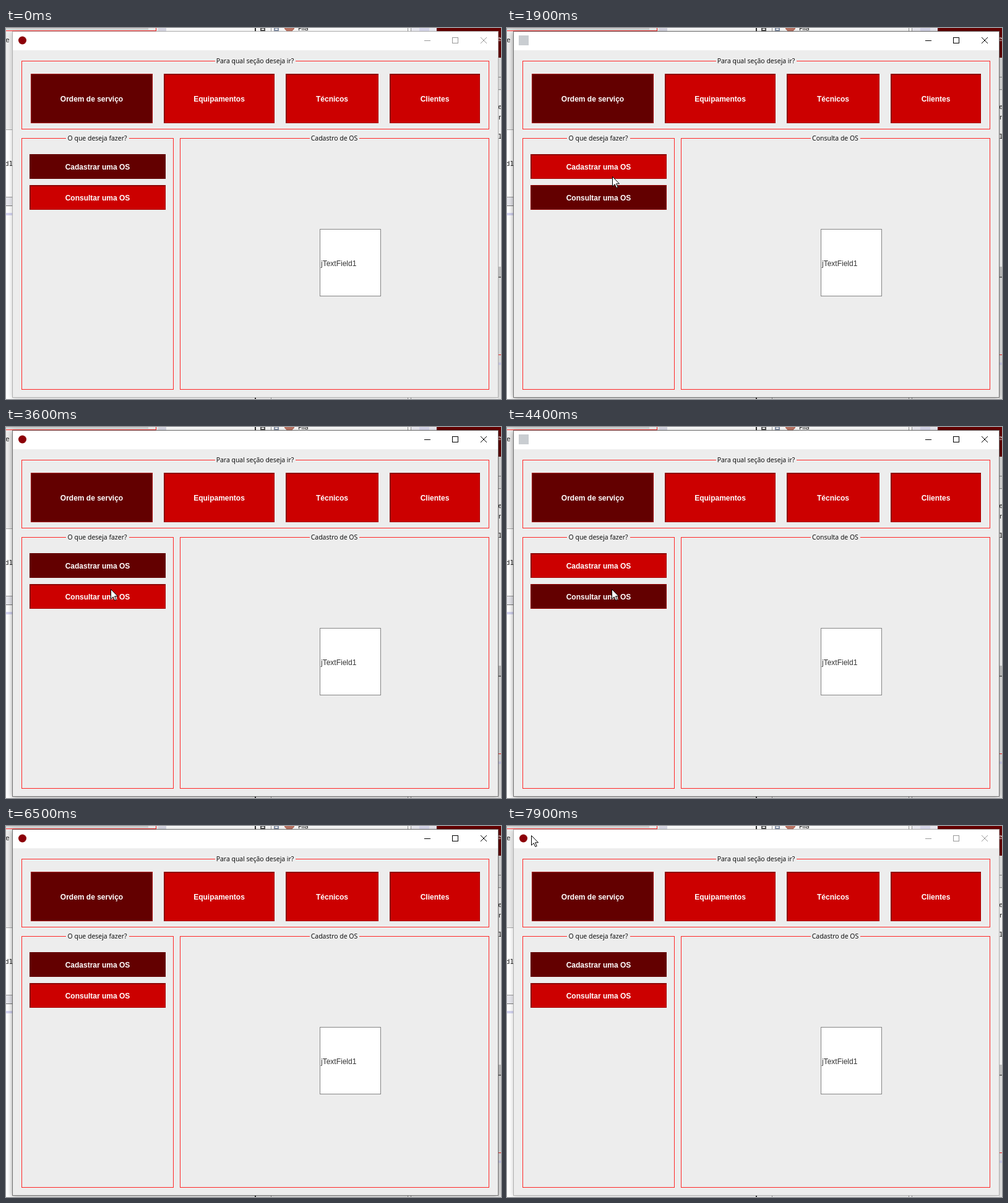
An HTML page for the animation above (8 s loop, 800 by 600 pixels).

```html
<!DOCTYPE html>
<html lang="pt-BR">
<head>
<meta charset="utf-8">
<title>Cadastro de OS</title>
<style>
  html, body { margin: 0; width: 100%; height: 100%; overflow: hidden; background: #fff; }
  svg { display: block; width: 800px; height: 600px; shape-rendering: crispEdges; }
  #cursor, #mark, #close { shape-rendering: auto; }
  text { font: 10.5px "Open Sans", sans-serif; }
  .button { font: bold 12px "Liberation Sans", Arial, sans-serif; fill: #fff; text-anchor: middle; }
  .label { text-anchor: middle; }
  .field { font: 12px "Liberation Sans", Arial, sans-serif; fill: #333; }
  .code { font: 11px "DejaVu Sans Mono", monospace; }
  .frame { fill: none; stroke: #ff2626; }
</style>
</head>
<body>
<svg id="stage" viewBox="0 0 800 600">
  <defs>
    <filter id="blur" x="-5%" y="-5%" width="110%" height="110%"><feGaussianBlur stdDeviation="4"/></filter>
  </defs>
  <g id="desktop"></g>
  <rect id="shadow" x="10" y="7" width="786" height="592" filter="url(#blur)"/>
  <rect x="11" y="6" width="784" height="592" fill="#ededed"/>
  <rect x="11" y="6" width="784" height="30" fill="#fff"/>
  <rect id="edge" x="10.5" y="5.5" width="785" height="592" fill="none"/>
  <g id="controls" fill="none">
    <path d="M676 20.5h10M721.5 15.5h9v9h-9z"/>
    <path id="close" d="M767 15l10 10M777 15l-10 10"/>
  </g>
  <circle id="mark" cx="26.5" cy="20" r="6.5" fill="#8c0008"/>
  <rect id="square" x="19" y="12" width="16" height="16" fill="#c9cdd1"/>
  <g id="panels"></g>
  <rect x="507.5" y="325.5" width="98" height="108" fill="#fff" stroke="#858585"/>
  <text class="field" x="509" y="385">jTextField1</text>
  <path id="cursor" d="M.5 .5V16.2L4.2 12.7 6.8 18.5 9.2 17.5 6.6 11.8H11.5Z" fill="#fff" stroke="#000"/>
</svg>
<script>
const $ = id => document.getElementById(id);
const desktop = $("desktop"), panels = $("panels");

function add(parent, tag, attrs, text = "") {
  const node = document.createElementNS("http://www.w3.org/2000/svg", tag);
  for (const name in attrs) node.setAttribute(name, attrs[name]);
  node.textContent = text;
  return parent.appendChild(node);
}
const rect = (x, y, width, height, fill) => add(desktop, "rect", { x, y, width, height, fill });
const code = (x, y, text, fill = "#222") => add(desktop, "text", { x, y, fill, class: "code" }, text);

function drawDesktop() {
  rect(0, 0, 800, 600, "#fff");
  // top strip
  rect(0, 0, 246, 8, "#eee");
  rect(0, 0, 230, 3, "#d2d2d2");
  rect(0, 4, 243, 1, "#f22");
  rect(242, 0, 1, 5, "#f22");
  rect(246, 0, 13, 8, "#dcdce8");
  rect(411, 0, 8, 5, "#555");
  rect(413, 1, 4, 2, "#fff");
  rect(433, 0, 8, 5, "#8a96ac");
  rect(435, 1, 4, 2, "#fff");
  add(desktop, "ellipse", { cx: 458, cy: 0, rx: 8, ry: 6, fill: "#bd7767" });
  add(desktop, "text", { x: 472, y: 4 }, "Fila");
  rect(655, 0, 41, 8, "#eeeef6");
  rect(668, 0, 16, 8, "#dcdcf0");
  rect(696, 0, 104, 48, "#600");
  // lines that run behind the window
  for (const y of [0, 597]) {
    rect(402, y, 2, 8, "#333");
    rect(428, y, 1, 8, "#999");
    rect(649, y, 1, 8, "#999");
    rect(654, y, 1, 8, "#999");
  }
  // left strip
  rect(0, 8, 10, 156, "#ededed");
  code(-1, 23, "e C");
  rect(0, 164, 10, 1, "#aaa");
  code(-2, 223, "d1");
  rect(0, 273, 10, 15, "#e8e8ee");
  rect(0, 273, 10, 1, "#999");
  rect(0, 287, 10, 1, "#777");
  rect(0, 299, 10, 4, "#d5d5f2");
  // right strip
  code(794, 21, "e", "#fff");
  rect(795, 48, 5, 53, "#e8e8e8");
  rect(795, 79, 5, 1, "#888");
  rect(795, 99, 5, 1, "#999");
  code(795, 131, "e");
  code(795, 148, "r");
  code(795, 179, "1");
  rect(795, 386, 5, 17, "#ccc");
  rect(795, 402, 5, 2, "#777");
  rect(795, 404, 5, 196, "#e9e9e9");
  rect(795, 528, 5, 1, "#f22");
  rect(795, 541, 5, 4, "#d5d5f2");
}

function addPanel(x, y, width, height, title, gap) {
  const middle = x + width / 2;
  add(panels, "rect", { x: x + .5, y: y + .5, width, height, class: "frame" });
  add(panels, "rect", { x: middle - gap / 2, y, width: gap, height: 1, fill: "#ededed" });
  return add(panels, "text", { x: middle, y: y + 4, class: "label" }, title);
}

// Returns a function that switches the button between its two looks.
function addButton(x, y, width, height, title, selectedEdge = "#a00000") {
  const base = add(panels, "rect", { x, y, width, height });
  const rim = add(panels, "rect", { x: x + .5, y: y + .5, width: width - 1, height: height - 1, fill: "none" });
  const bevel = add(panels, "path", {
    d: `M${x} ${y + 1}h${width}M${x + 1} ${y}v${height}`, stroke: "#8e0000", "stroke-width": 2
  });
  add(panels, "text", { x: x + width / 2, y: y + height / 2 + 5, class: "button" }, title);
  const select = on => {
    base.setAttribute("fill", on ? "#630000" : "#cc0000");
    rim.setAttribute("stroke", on ? selectedEdge : "#a80000");
    bevel.setAttribute("visibility", on ? "hidden" : "visible");
  };
  select(false);
  return select;
}

drawDesktop();
addPanel(25, 53, 755, 110, "Para qual seção deseja ir?", 130);
addPanel(25, 178, 245, 406, "O que deseja fazer?", 102);
const heading = addPanel(281, 178, 499, 406, "Cadastro de OS", 80);
addButton(40, 74, 197, 80, "Ordem de serviço")(true);
addButton(255, 74, 179, 80, "Equipamentos");
addButton(452, 74, 150, 80, "Técnicos");
addButton(620, 74, 146, 80, "Clientes");
const selectRegister = addButton(38, 204, 220, 40, "Cadastrar uma OS", "#630000");
const selectSearch = addButton(38, 254, 220, 40, "Consultar uma OS", "#910000");

const LOOP = 8000, STEP = 100;
// time, x, y of the pointer
const track = [
  [100, 785, 526], [500, 25, 1], [900, 161, 265], [1100, 165, 274], [1600, 165, 274],
  [1900, 170, 240], [2100, 168, 218], [2400, 168, 218], [2500, 167, 218], [2800, 167, 218],
  [3600, 169, 262], [4500, 169, 262], [4800, 172, 232], [5000, 172, 232], [5100, 172, 227],
  [6000, 172, 227], [6200, 52, 0], [6400, 553, 367], [7500, 560, 580], [7900, 39, 15]
];
const within = (t, from, to) => t >= from && t < to;

function pointerAt(t) {
  const next = track.findIndex(key => key[0] > t);
  if (next < 1) return track[track.length - 1].slice(1);
  const [t0, x0, y0] = track[next - 1], [t1, x1, y1] = track[next];
  const p = (t - t0) / (t1 - t0), ease = p * p * (3 - 2 * p);
  return [x0 + (x1 - x0) * ease, y0 + (y1 - y0) * ease].map(Math.round);
}

function show(id, on) { $(id).setAttribute("visibility", on ? "visible" : "hidden"); }

function draw(now) {
  const t = Math.floor(now % LOOP / STEP) * STEP;
  const searching = within(t, 1600, 2800) || within(t, 4300, 5600);
  const active = within(t, 1600, 7400);

  selectRegister(!searching);
  selectSearch(searching);
  heading.textContent = searching ? "Consulta de OS" : "Cadastro de OS";
  show("mark", !searching);
  show("square", searching);

  $("controls").setAttribute("stroke", active ? "#000" : "#999");
  $("edge").setAttribute("stroke", active ? "#707070" : "#b0b0b0");
  $("shadow").setAttribute("opacity", active ? .4 : .22);

  show("cursor", t >= 100 && !within(t, 6500, 7500));
  $("cursor").setAttribute("transform", `translate(${pointerAt(t)})`);
  requestAnimationFrame(draw);
}
requestAnimationFrame(draw);
</script>
</body>
</html>
```
